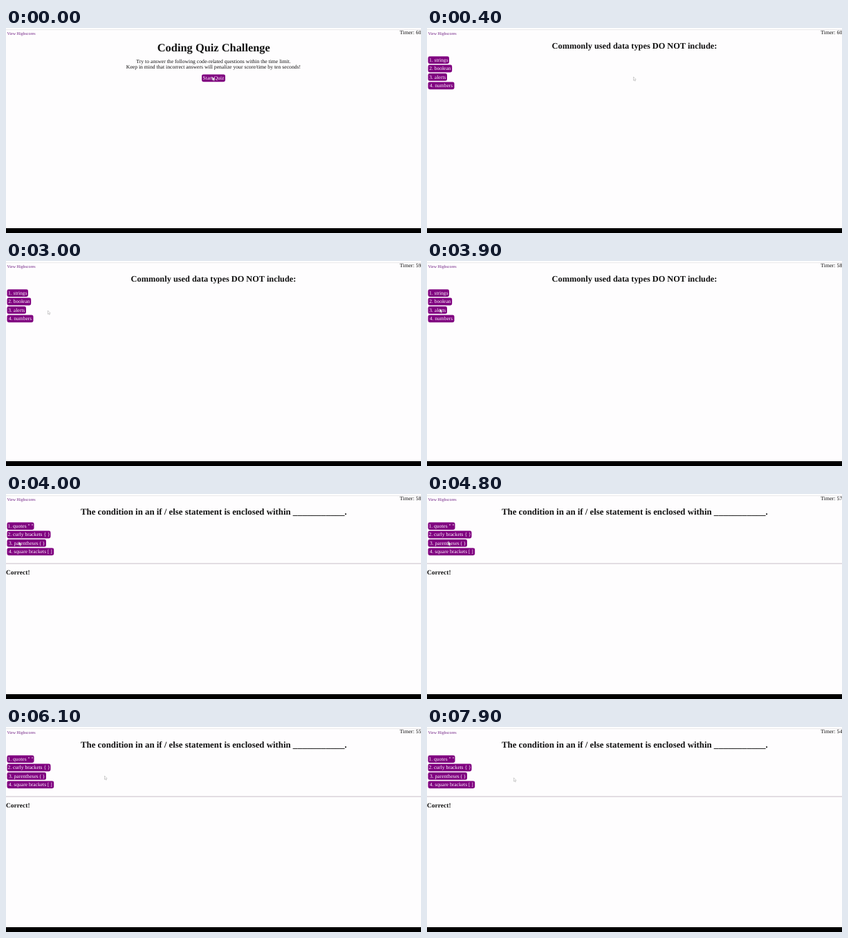
Write an HTML page that moves like this. It is 600x298 px and loops after 8000 ms.

```html
<!DOCTYPE html>
<html lang="en">
<head>
<meta charset="utf-8">
<title>Coding Quiz Challenge</title>
<style>
  html, body { margin: 0; height: 100%; overflow: hidden; background: #fefdfe; }
  svg { display: block; width: 100%; height: 100%; }
  text { font: 7.7px "Liberation Serif", serif; fill: #111; text-rendering: geometricPrecision; white-space: pre; }
  .mid { text-anchor: middle; }
  .bold { font-weight: bold; }
  .button rect { fill: #800080; }
  .button text { fill: #fff; font-size: 7.55px; text-anchor: middle; }
</style>
</head>
<body>
<svg viewBox="0 0 600 298">
  <rect y="2" width="600" height="1" fill="#ebe9eb"/>
  <rect y="291" width="600" height="7"/>
  <text x="1.4" y="9.9" style="font-size:6px;fill:#6d1a80">View Highscores</text>
  <text id="timer" x="600.4" y="9.4" text-anchor="end" style="font-size:7.9px"></text>

  <g class="screen" data-top="67.5">
    <text class="mid bold" x="300.3" y="34" style="font-size:16.4px">Coding Quiz Challenge</text>
    <text class="mid" x="300" y="51.3">Try to answer the following code-related questions within the time limit.</text>
    <text class="mid" x="300" y="58.6">Keep in mind that incorrect answers will penalize your score/time by ten seconds!</text>
  </g>
  <g class="screen">
    <text class="mid bold" x="300" y="30.4" style="font-size:12.33px">Commonly used data types DO NOT include:</text>
  </g>
  <g class="screen">
    <text class="bold" x="108" y="30.4" style="font-size:12.84px">The condition in an if / else statement is enclosed within <tspan font-size="13.6">___________</tspan>.</text>
    <rect y="100.6" width="600" height="1" fill="#c8bfc8"/>
    <text class="bold" x="0" y="117.3" style="font-size:9.5px">Correct!</text>
  </g>

  <path id="cursor" d="M0 0V5.3L1.2 4.2 2 6.1 2.9 5.7 2.1 3.9H3.7Z" fill="#fff" stroke="#999" stroke-width=".45"/>
</svg>
<script>
const LOOP = 8000, STEP = 100;
const screens = [...document.querySelectorAll('.screen')];
const timer = document.getElementById('timer');
const cursor = document.getElementById('cursor');

function addButton(screen, label, x, y, width) {
  screen.insertAdjacentHTML('beforeend', `<g class="button">
    <rect x="${x}" y="${y}" width="${width}" height="10.8" rx="2.4"/>
    <text x="${x + width / 2}" y="${y + 7.7}">${label}</text></g>`);
}

function addOptions(screen, options) {
  options.forEach(([label, width], i) =>
    addButton(screen, `${i + 1}. ${label}`, 1.5, 41.2 + i * 12.4, width));
}

addButton(screens[0], 'Start Quiz', 283, 67.4, 34);
addOptions(screens[1], [['strings', 30.5], ['boolean', 34.7], ['alerts', 27.5], ['numbers', 38]]);
addOptions(screens[2], [['quotes " "', 39], ['curly brackets { }', 63],
  ['parentheses ( )', 56.5], ['square brackets [ ]', 67.7]]);

// Cursor stops: time, x, y
const stops = [
  [0, 298.5, 71], [1000, 298.5, 71], [1600, 191.7, 93.7], [2000, 191.7, 93.7],
  [2900, 60.5, 72], [3000, 60.5, 72], [3700, 18.7, 69.5], [4200, 18.7, 69.5],
  [4700, 30.7, 69.5], [5300, 30.7, 69.5], [5800, 118, 75], [6100, 142.5, 71],
  [7200, 142.5, 71], [7900, 125.4, 73.8], [LOOP, 125.4, 73.8]
];

function cursorAt(t) {
  const i = stops.findIndex(stop => stop[0] > t);
  const [t0, x0, y0] = stops[i - 1], [t1, x1, y1] = stops[i];
  const p = (t - t0) / (t1 - t0), eased = p * p * (3 - 2 * p);
  return [x0 + (x1 - x0) * eased, y0 + (y1 - y0) * eased];
}

function draw(now) {
  const t = Math.floor(now % LOOP / STEP) * STEP;
  const current = t < 100 ? 0 : t < 4000 ? 1 : 2;
  screens.forEach((screen, i) => screen.style.display = i === current ? '' : 'none');
  timer.textContent = 'Timer: ' + (60 - Math.max(0, Math.floor((t - 1100) / 1000)));
  cursor.setAttribute('transform', `translate(${cursorAt(t)})`);
}

const start = performance.now();
function frame() {
  draw(performance.now() - start);
  requestAnimationFrame(frame);
}
frame();
</script>
</body>
</html>
```
